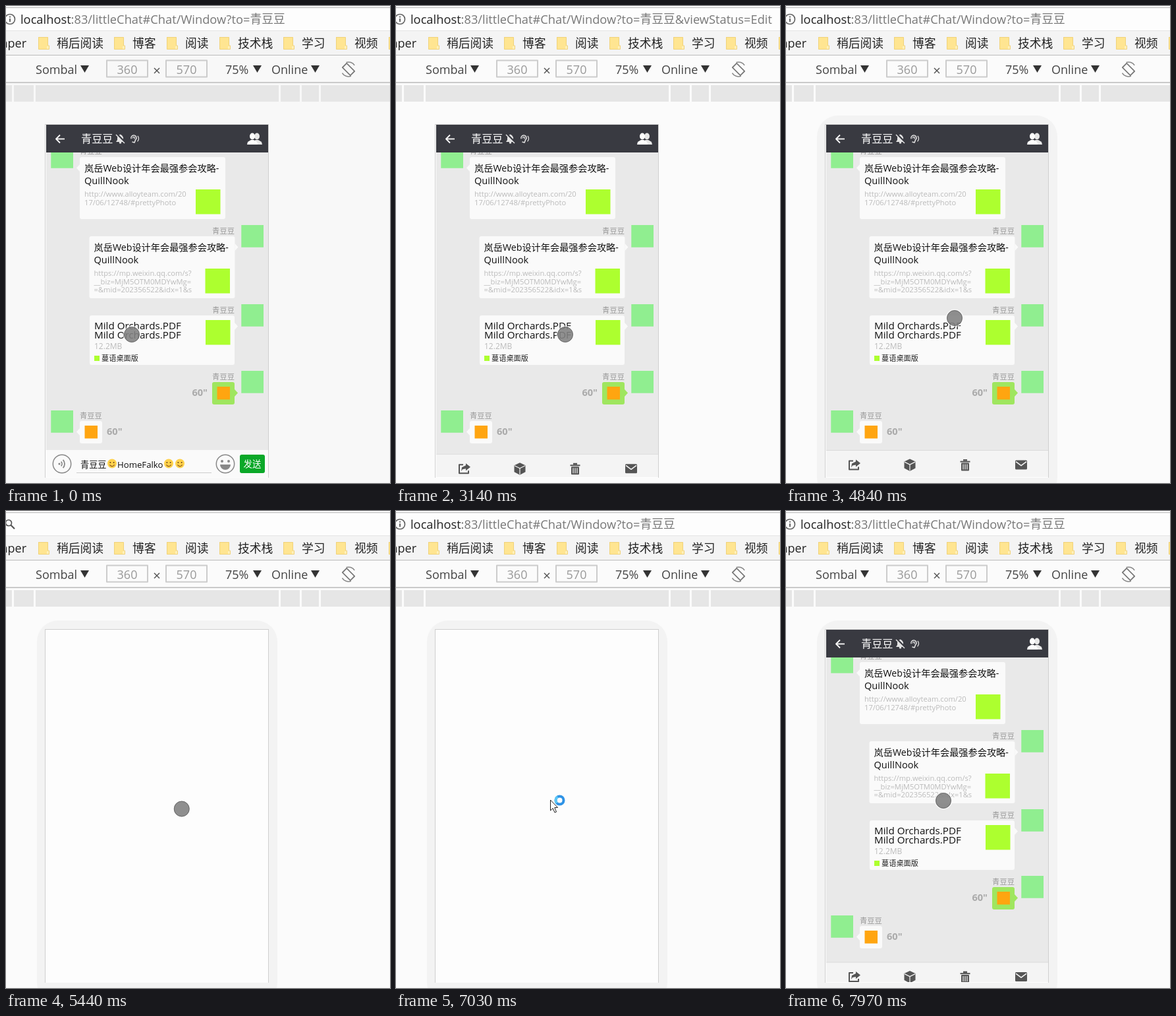
These frames come from a looping animation (583x723 px, 8000 ms). An HTML page with a canvas:

```html
<!DOCTYPE html>
<html lang="zh-CN">
<head>
<meta charset="utf-8">
<title>Chat window</title>
<style>
html, body { margin: 0; width: 100%; height: 100%; overflow: hidden; background: #fafafa; }
canvas { display: block; }
</style>
</head>
<body>
<canvas id="stage" width="583" height="723"></canvas>
<script>
const ctx = document.getElementById('stage').getContext('2d');
const LOOP = 8000, SLIDE = 160, BAR = 42;
const SANS = '"Open Sans", "Noto Sans CJK SC", "Noto Sans CJK", sans-serif';
const NAME = '青豆豆';
const LEAVE_PAGE = 5300, FORWARD = 6650, RELOAD = 7620;

// ---------- helpers ----------
function rect(x, y, w, h, color, r = 0) {
  ctx.fillStyle = color;
  ctx.beginPath();
  ctx.roundRect(x, y, w, h, r);
  ctx.fill();
}
function disc(x, y, r, color) {
  ctx.fillStyle = color;
  ctx.beginPath();
  ctx.arc(x, y, r, 0, Math.PI * 2);
  ctx.fill();
}
function arc(x, y, r, from, to, color, w) {
  ctx.strokeStyle = color;
  ctx.lineWidth = w;
  ctx.beginPath();
  ctx.arc(x, y, r, from, to);
  ctx.stroke();
}
function ring(x, y, r, color, w) { arc(x, y, r, 0, Math.PI * 2, color, w); }
function trace(pts) {
  ctx.beginPath();
  for (let i = 0; i < pts.length; i += 2) ctx.lineTo(pts[i], pts[i + 1]);
}
function poly(color, ...pts) {
  trace(pts);
  ctx.fillStyle = color;
  ctx.fill();
}
function line(color, w, ...pts) {
  trace(pts);
  ctx.strokeStyle = color;
  ctx.lineWidth = w;
  ctx.stroke();
}
// y is the vertical middle of the line; returns the x after the text
function text(s, x, y, size, color, { align = 'left', weight = 400, font = SANS } = {}) {
  ctx.font = `${weight} ${size}px ${font}`;
  ctx.textAlign = align;
  ctx.fillStyle = color;
  ctx.fillText(s, x, y + size * 0.36);
  return x + ctx.measureText(s).width;
}
function at(x, y, draw) {
  ctx.save();
  ctx.translate(x, y);
  draw();
  ctx.restore();
}
function ease(p) {
  if (p <= 0) return 0;
  if (p >= 1) return 1;
  let lo = 0, hi = 1, s = 0.5;
  for (let i = 0; i < 16; i++) {
    s = (lo + hi) / 2;
    const x = 0.75 * s * (1 - s) + s ** 3;
    if (x < p) lo = s; else hi = s;
  }
  return 0.3 * s * (1 - s) ** 2 + 3 * (1 - s) * s * s + s ** 3;
}

// ---------- timeline ----------
const within = (t, spans) => spans.some(([a, b]) => t >= a && t < b);
const editing = t => within(t, [[1240, 1860], [2720, 3580], [4160, 4830], [RELOAD, 7935]]);
const bezelSeen = t => within(t, [[1240, 2720], [3580, LOOP]]);

// [enter, leave] times of the two bottom bars
const INPUT = [[-500, 1240], [2060, 2720], [3780, 4160], [5000, RELOAD - SLIDE]];
const TOOLS = [[1365, 1860], [3050, 3580], [4340, 4840], [7400, 7942]];
function shown(t, spans) {
  return Math.max(0, ...spans.map(([a, b]) => ease((t - a) / SLIDE) - ease((t - b) / SLIDE)));
}

const PATH = [
  [0, 191, 498], [1560, 192, 498], [2030, 215, 502], [2410, 269, 503], [2720, 268, 503],
  [2880, 257, 498], [4300, 257, 498], [4800, 256, 473], [5000, 256, 473],
  [5600, 269, 447], [6520, 269, 447], [6900, 239, 439], [LOOP, 239, 439]
];
function pointer(t) {
  const i = PATH.findIndex(k => k[0] > t);
  const [ta, xa, ya] = PATH[i - 1], [tb, xb, yb] = PATH[i];
  const p = (t - ta) / (tb - ta), e = p * p * (3 - 2 * p);
  return [xa + (xb - xa) * e, ya + (yb - ya) * e];
}

// ---------- browser ----------
function folder(x) {
  rect(x, 47, 15, 19, '#ffe591', 1);
  line('#f0d27a', 1, x + .5, 47.5, x + 14.5, 47.5, x + 14.5, 60, x + 16.5, 60, x + 16.5, 65.5, x + .5, 65.5, x + .5, 47);
  rect(x + 13, 61, 3, 4, '#fff0b8');
}
function address(t) {
  rect(0, 3, 583, 34, '#fdfdfd');
  if (t >= LEAVE_PAGE && t < FORWARD) {
    ring(4, 18, 4.5, '#555', 1.7);
    line('#555', 2.2, 7, 21, 13, 27);
    return;
  }
  ring(6, 20, 7.5, '#666', 1.7);
  rect(5, 19, 2, 5, '#666');
  rect(5, 15.5, 2, 2, '#666');
  let x = text('localhost', 22, 20, 18.3, '#222');
  x = text(':83/littleChat#Chat/Window?to=', x, 20, 18.3, '#777');
  x = text(NAME, x, 20, 17.8, '#777');
  if (editing(t)) text('&viewStatus=Edit', x, 20, 18.3, '#777');
}
function arrowDown(x) { poly('#333', x, 90, x + 13, 90, x + 6.5, 101); }
function sizeBox(x, s) {
  ctx.strokeStyle = '#ccc';
  ctx.lineWidth = 2;
  ctx.strokeRect(x, 82.5, 62, 25);
  text(s, x + 31, 97, 18, '#999', { align: 'center' });
}
function browser(t) {
  rect(0, 0, 583, 723, t < 1240 ? '#f8f8f8' : '#fbfbfb');
  rect(0, 2, 583, 1, '#b8b8b8');
  address(t);
  rect(0, 37, 583, 38, '#f4f4f4');
  rect(0, 37, 583, 1, '#e4e4e4');
  rect(0, 74, 583, 1, '#bbb');
  text('aper', 31, 57, 18, '#222', { align: 'right' });
  [[49, '稍后阅读'], [164, '博客'], [244, '阅读'], [324, '技术栈'], [421, '学习'], [501, '视频'], [581, '']]
    .forEach(([x, s]) => {
      folder(x);
      text(s, x + 28, 57, 17.8, '#222');
    });

  rect(0, 115, 583, 2, '#cacaca');
  text('Sombal', 45, 97, 18, '#444');
  text('75%', 333, 97, 18, '#444');
  text('Online', 403, 97, 18, '#444');
  [113, 375, 463].forEach(arrowDown);
  sizeBox(153, '360');
  sizeBox(243, '570');
  line('#555', 1.5, 225, 94, 233, 102);
  line('#555', 1.5, 233, 94, 225, 102);
  at(520, 96, () => {
    ctx.rotate(-Math.PI / 4);
    ctx.strokeStyle = '#777';
    ctx.lineWidth = 1.8;
    ctx.strokeRect(-4.5, -8.5, 9, 17);
    arc(0, 0, 11, -1.1, 0.2, '#888', 1.6);
    arc(0, 0, 11, 2, 3.4, '#888', 1.6);
  });
  [[0, 9], [12, 42], [45, 414], [417, 446], [449, 475], [478, 583]]
    .forEach(([a, b]) => rect(a, 120, b - a, 25, '#e6e6e6'));

  if (bezelSeen(t)) rect(47, 166, 365, 580, '#f3f3f3', 32);
  rect(59, 179, 340, 536, '#d0d0d0');
  rect(60, 180, 338, 535, '#fdfdfd');
}

// ---------- chat ----------
const avatar = (x, y) => rect(x + .25, y, 33.75, 33.75, '#90ee90');
const lime = (x, y) => rect(x, y, 37.5, 37.5, '#adff2f');
function label(x, y, align) { text(NAME, x, y, 11.3, '#999', { align }); }
function bubble(x, y, w, h, side, color = '#fafafa') {
  rect(x, y, w, h, color, 3);
  const edge = side < 0 ? x : x + w;
  poly(color, edge, y + 11, edge + side * 5, y + 16.5, edge, y + 22);
}
function linkCard(x, y, side, rows) {
  bubble(x, y, 221, 94, side);
  text('岚岳Web设计年会最强参会攻略-', x + 7, y + 17, 14.2, '#111');
  text('QuillNook', x + 7, y + 35.5, 14.6, '#111');
  rows.forEach((s, i) => text(s, x + 7, y + 56 + i * 12.7, 11.2, '#bbb'));
  lime(x + 176, y + 49);
}
function voice(x, y, side, color) {
  bubble(x, y, 34, 34, side, color);
  rect(x + 7.5, y + 7, 19.5, 19.5, '#ffa510');
  text('60"', side < 0 ? x + 41 : x - 7, y + 16, 14.6, '#aaa', { weight: 700, align: side < 0 ? 'left' : 'right' });
}
function messages() {
  rect(61, 222, 337, 492, '#e9e9e9');
  ctx.save();
  ctx.beginPath();
  ctx.rect(61, 222, 337, 492);
  ctx.clip();
  avatar(68, 212);
  label(112, 220, 'left');
  ctx.restore();
  linkCard(112, 229, -1, ['http://www.alloyteam.com/20', '17/06/12748/#prettyPhoto']);

  [332, 452, 553].forEach(y => {
    avatar(357, y);
    label(347, y + 8.5, 'right');
  });
  linkCard(126.5, 349, 1, ['https://mp.weixin.qq.com/s?', '__biz=MjM5OTM0MDYwMg=', '=&mid=202356522&idx=1&s']);

  bubble(127, 469, 220, 75, 1);
  text('Mild Orchards.PDF', 134, 484.5, 15.2, '#111');
  text('Mild Orchards.PDF', 134, 499, 15.2, '#111');
  text('12.2MB', 134, 516, 12, '#bbb');
  lime(303, 476);
  rect(134, 530, 8, 8, '#adff2f');
  text('蔓语桌面版', 145, 533.5, 11.2, '#222');

  voice(313, 570, 1, '#9fe65f');
  avatar(68, 613);
  label(112, 621, 'left');
  voice(112, 629, -1);
}
function header() {
  const c = '#fff', pale = '#e2e2e2';
  rect(61, 180, 337, 42, '#393a41');
  line(c, 1.8, 89, 201.5, 76, 201.5);
  line(c, 1.8, 82, 195.5, 76, 201.5, 82, 207.5);
  text(NAME, 114, 201, 16.2, c);
  poly(pale, 167, 206, 169, 203, 169, 199, 171, 196, 173.5, 194.5, 176, 196, 178, 199, 178, 203, 180, 206);
  disc(173.5, 207, 1.8, pale);
  line('#393a41', 3, 168, 194, 181, 207);
  line(pale, 1.5, 167, 195, 180, 208);
  arc(194, 200, 4, 2.8, 6.9, pale, 1.6);
  line(pale, 1.6, 197, 202, 195, 207, 191.5, 206);
  arc(194, 200, 1.5, 2.8, 7.5, pale, 1.2);
  arc(196, 201, 5.5, -0.8, 0.9, pale, 1.3);
  [[381, '#e8e8e8'], [374, c]].forEach(([x, color]) => {
    ctx.fillStyle = color;
    ctx.beginPath();
    ctx.ellipse(x, 197.5, 4, 5, 0, 0, Math.PI * 2);
    ctx.fill();
    poly(color, x - 8, 210, x - 7, 206, x - 2, 203, x + 2, 203, x + 7, 206, x + 8, 210);
  });
}
function emoji(x, y) {
  disc(x, y, 7, '#ffd24c');
  disc(x - 2.6, y - 1.5, 1, '#6a4318');
  disc(x + 2.6, y - 1.5, 1, '#6a4318');
  arc(x, y + .5, 3.6, 0.3, 2.84, '#8a5520', 1.2);
}
function inputBar() {
  const c = '#888';
  rect(61, 0, 337, BAR, '#fafafa');
  ring(85, 21, 13.7, c, 1.5);
  disc(81, 21, 1.6, c);
  [5, 9].forEach(r => arc(80, 21, r, -0.75, 0.75, c, 1.8));
  text(NAME, 113, 22, 13.2, '#111');
  text('HomeFalko', 169, 22, 13.2, '#111');
  [161, 247, 264].forEach(x => emoji(x, 20.5));
  rect(107, 34, 205, 1, '#ccc');
  ring(333, 21, 13.7, c, 1.5);
  disc(328, 17, 2, c);
  disc(338, 17, 2, c);
  ctx.fillStyle = c;
  ctx.beginPath();
  ctx.arc(333, 22, 8, 0, Math.PI);
  ctx.fill();
  rect(355, 7, 38, 28, '#0ba828', 3);
  text('发送', 374, 21, 13.4, '#fff', { align: 'center' });
}
function toolBar() {
  const c = '#555', bg = '#f4f4f4';
  rect(61, 0, 337, BAR, bg);
  rect(61, 0, 337, 1, '#dadada');
  at(104, 22.5, () => {
    line(c, 2, -2, -6, -8, -6, -8, 7, 6, 7, 6, 3);
    poly(c, 2, -8, 9, -2.5, 2, 3, 2, 0, -3, 1, -5, 4, -4, -2, 2, -5);
  });
  at(188, 22.5, () => {
    poly(c, 0, -9, 8.5, -5, 8.5, 5, 0, 9.5, -8.5, 5, -8.5, -5);
    line(bg, 1.2, -8, -4.5, 0, -.5, 8, -4.5);
    line(bg, 1.2, 0, -.5, 0, 9);
  });
  at(272, 22.5, () => {
    rect(-7.5, -6, 15, 2, c);
    rect(-3, -8.5, 6, 2.5, c);
    rect(-6, -3, 12, 12, c, 1);
    [-3, 0, 3].forEach(x => rect(x - .6, -1, 1.2, 8, bg));
  });
  at(357, 22.5, () => {
    rect(-9, -7, 18, 14, c, 1.5);
    line(bg, 1.6, -8, -5, 0, 1, 8, -5);
  });
}
function chat(t) {
  messages();
  ctx.save();
  ctx.beginPath();
  ctx.rect(61, 180, 337, 534);
  ctx.clip();
  [[INPUT, inputBar], [TOOLS, toolBar]].forEach(([spans, draw]) => {
    const p = shown(t, spans);
    if (p > 0) at(0, 715 - BAR * p, draw);
  });
  ctx.restore();
  header();
}

// ---------- new tab page ----------
function tile(y, title, font) {
  rect(275, y - 1, 130, 122, '#d9d9d9', 2);
  rect(276, y, 130, 119, '#fafafa', 2);
  text(title, 305.5, y + 14, 11, '#333', { font });
}
function newTab() {
  ctx.save();
  ctx.beginPath();
  ctx.rect(60, 180, 338, 535);
  ctx.clip();

  tile(290, '主页 - 栗小禾', SANS);
  line('#666', 1.4, 286, 298, 291, 298, 295, 302, 295, 310, 286, 310, 286, 298);
  line('#666', 1.2, 291, 298, 291, 302, 295, 302);
  rect(277, 320, 125, 89, '#ebeff2');
  rect(277, 320, 15, 89, '#3c5068');
  rect(277, 319, 125, 10, '#14b191');
  rect(277, 319, 15, 10, '#1a9b82');
  text('主页', 292, 324, 4, '#d8fff4');
  rect(296, 333, 106, 76, '#eef2f5');
  text('今天是 六月 八日 周四 ，欢迎回来', 306, 344, 5, '#68727c');
  disc(375, 344, 2.2, '#14b191');
  text('您好!', 379, 344, 5, '#68727c');
  rect(306, 351, 26, 9, '#16b394', 1);
  rect(334, 351, 26, 9, '#e8822e', 1);
  text('我的课表', 319, 355.5, 4.5, '#fff', { align: 'center' });
  text('我的成绩', 347, 355.5, 4.5, '#fff', { align: 'center' });
  text('● 更新日志', 306, 380, 4.5, '#8d969e');
  for (let i = 0; i < 5; i++) text('修复若干问题并且调整页面显示的效果与速度', 306, 387 + i * 4.8, 4, '#bcc4ca');

  tile(425, 'http://localhos', 'Roboto, "Liberation Sans", sans-serif');
  disc(290, 440, 6, '#77706c');
  rect(276, 454, 130, 90, '#f2f2f2');
  disc(346, 498, 7.5, '#d0d0d0');
  ctx.restore();
}

// ---------- pointer ----------
function drawPointer(t) {
  if (t >= FORWARD + 100 && t < RELOAD) {
    at(234.5, 438, () => {
      const shape = [0, 0, 0, 16, 3.7, 12.6, 6.5, 19, 9, 18, 6.3, 11.6, 11, 11.4, 0, 0];
      poly('#fff', ...shape);
      line('#222', 1, ...shape);
      ring(14, .5, 6, '#2f93e6', 4);
      arc(14, .5, 6, 2.4, 4.2, '#5cc6f5', 4);
    });
    return;
  }
  const [x, y] = pointer(t);
  disc(x, y, 13.5, 'rgba(255,255,255,.6)');
  disc(x, y, 11.8, 'rgba(100,100,100,.72)');
  ring(x, y, 11.5, 'rgba(80,80,80,.65)', 1);
}

function draw(t) {
  ctx.lineJoin = 'round';
  browser(t);
  if (t < LEAVE_PAGE || t >= RELOAD) chat(t);
  else if (t >= LEAVE_PAGE + 180 && t < FORWARD) newTab();
  drawPointer(t);
}
const start = performance.now();
function tick() {
  draw((performance.now() - start) % LOOP);
  requestAnimationFrame(tick);
}
tick();
</script>
</body>
</html>
```
